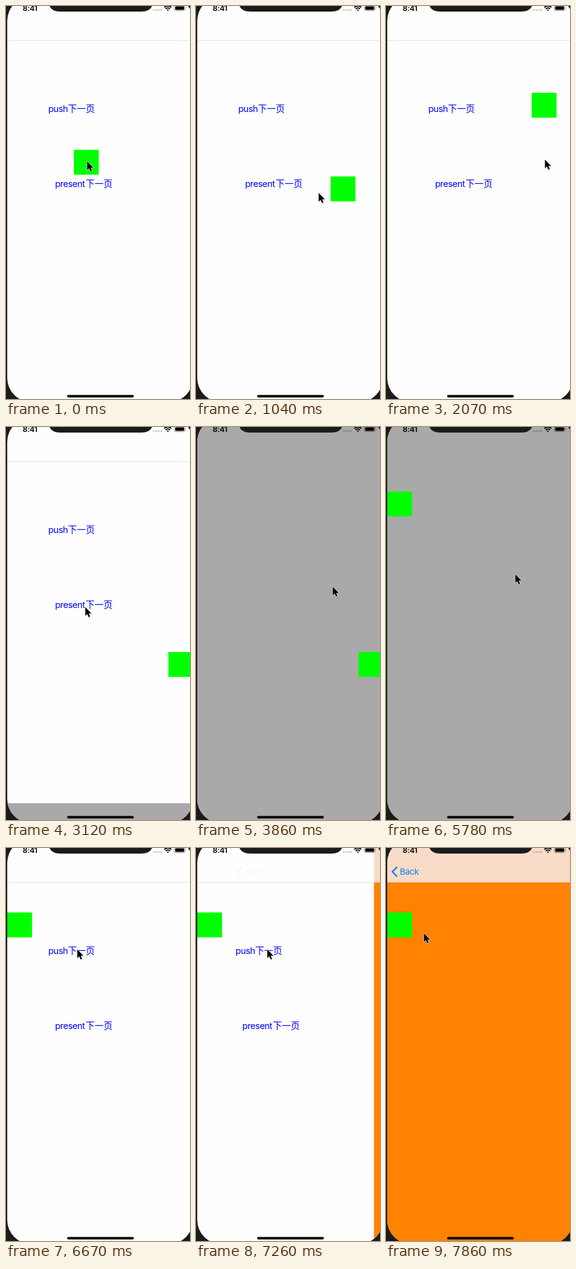
Animation of 298 by 634 pixels, one loop 8 s. Source, as an HTML page:

```html
<!DOCTYPE html>
<html lang="zh">
<head>
<meta charset="utf-8">
<title>Floating square</title>
<style>
  html, body { margin: 0; width: 100%; height: 100%; overflow: hidden; background: #1c1b1c; }
  svg { display: block; width: 298px; height: 634px; }
  text { font-family: Inter, "Noto Sans CJK SC", "Noto Sans CJK", sans-serif; }
  .label { font-size: 14.5px; fill: #00f; }
  .latin { letter-spacing: -.037em; }
  .han { font-family: "Noto Sans CJK SC", "Noto Sans CJK", sans-serif; font-weight: 300; }
  .back { font-size: 13.7px; fill: #0a7af5; letter-spacing: -.03em; }
  .time { font-size: 12.3px; font-weight: 600; letter-spacing: -.02em; }
</style>
</head>
<body>
<svg viewBox="0 0 298 634">
  <defs>
    <clipPath id="screen"><rect x="2" y="-15" width="301" height="654" rx="39"/></clipPath>
  </defs>
  <g clip-path="url(#screen)">
    <rect width="298" height="634" fill="#fefefe"/>
    <g id="home" class="label">
      <text x="68.5" y="171" class="latin">push</text>
      <text x="100.3" y="171" class="han">下一页</text>
      <text x="79.5" y="291.5" class="latin">present</text>
      <text x="129" y="291.5" class="han">下一页</text>
    </g>
    <rect y="55" width="298" height="1" fill="#e3e3e3"/>
    <g id="next">
      <rect x="2" y="55" width="301" height="584" fill="#ff8200"/>
      <rect x="2" y="-15" width="301" height="70.5" fill="#f8dcc7"/>
    </g>
    <g id="back">
      <path d="M18 30.5 10.3 38.2 18 46" fill="none" stroke="#0a7af5" stroke-width="2.3"/>
      <text class="back" x="22.5" y="43">Back</text>
    </g>
    <rect id="sheet" x="2" width="301" height="660" fill="#a9a9a9"/>
    <rect id="square" width="40.2" height="40.2" fill="#0f0"/>
    <text class="time" x="27" y="8">8:41</text>
    <path d="M239.5 6.5h13" stroke="#000" stroke-opacity=".22" stroke-width="3"
          stroke-linecap="round" stroke-dasharray="0 4"/>
    <g fill="none" stroke="#000" stroke-width="1.9">
      <path d="M256.4 2.3a8.4 8.4 0 0 1 11.4 0M258.6 4.7a5.1 5.1 0 0 1 7 0"/>
      <path d="M262.1 8 260.4 6.2a2.6 2.6 0 0 1 3.4 0Z" fill="#000" stroke="none"/>
    </g>
    <rect x="272.5" y="-1" width="17.5" height="8.5" rx="2.3" fill="none" stroke="#000" stroke-opacity=".4"/>
    <rect x="274" y=".4" width="14.5" height="5.8" rx="1.2"/>
    <path d="M291.2 1.8q1.4 1.4 0 3z" opacity=".4"/>
    <rect x="99" y="627.6" width="108" height="4" rx="2"/>
    <path d="M69 -5Q71 9 88 9H219Q236 9 238 -5Z" fill="#1c1b1c"/>
  </g>
  <g id="cursor">
    <path d="M0 1V15.8L3.5 12.6 6 18 8.4 17 6 11.7H11Z" opacity=".22" transform="translate(.6 .8)"/>
    <path d="M.4 .6V14.6L3.6 11.7 5.8 16.8 8.2 15.8 6.1 10.8H10.4Z" stroke="#fff"
          stroke-width="1.3" stroke-linejoin="round" paint-order="stroke"/>
  </g>
</svg>
<script>
const LOOP = 8000, STEPS = 54;      // the picture advances in even steps
const GRAB = [21, 18], LEAD = 0.8;  // the dragged square trails the pointer

// Corners of the two drags, passed two steps apart; each ends at a screen edge.
const firstDrag = [[110, 232], [9, 390], [150, 109], [218, 275], [116, 295],
                   [130, 65], [236, 140], [236, 363], [263, 363]];
const secondDrag = [[263, 363], [220, 375], [118, 208], [110, 552], [20, 250], [2, 104]];

// Free pointer movements: from step, to step, destination.
const glides = [
  [15, 20, [128, 290]], [24, 26, [221, 257]], [26, 28, [284, 381]],
  [38, 39, [209, 237]], [41, 45, [115, 163]], [50, 53, [61, 137]]
];

const clamp = (v, max = 1) => Math.min(max, Math.max(0, v));
const smooth = p => p * p * (3 - 2 * p);
const mix = (a, b, p) => a.map((v, i) => v + (b[i] - v) * p);

// Critically damped spring from 0 to 1.
function spring(elapsed) {
  const x = 2.6 * Math.max(0, elapsed);
  return 1 - (1 + x) * Math.exp(-x);
}

function along(points, position) {
  const p = clamp(position, points.length - 1);
  const i = Math.min(Math.floor(p), points.length - 2);
  return mix(points[i], points[i + 1], p - i);
}

const squareAt = step =>
  step < 28 ? along(firstDrag, (step - 1) / 2) : along(secondDrag, (step - 28) / 2);

function pointerAt(step) {
  const dragging = step < 15 || (step >= 28 && step < 39);
  if (dragging) return mix(squareAt(step + LEAD), [0, 0], 0).map((v, i) => v + GRAB[i]);
  return glides.reduce((at, [from, to, target]) =>
    mix(at, target, smooth(clamp((step - from) / (to - from)))), [257, 381]);
}

const [home, next, back, sheet, square, cursor] =
  ['home', 'next', 'back', 'sheet', 'square', 'cursor'].map(id => document.getElementById(id));
const move = (node, x, y = 0) => node.setAttribute('transform', `translate(${x} ${y})`);

function draw(time) {
  const step = Math.floor(time % LOOP / (LOOP / STEPS));
  const covered = spring(step - 20.865) - spring(step - 40.865);
  const push = spring(step - 48.865);
  move(square, ...squareAt(step));
  move(cursor, ...pointerAt(step));
  move(sheet, 0, 639 - 654 * covered);
  move(home, -90 * push);
  move(next, 301 * (1 - push));
  move(back, 60 * (1 - push));
  back.setAttribute('opacity', push);
}

const start = performance.now();
function tick() {
  draw(performance.now() - start);
  requestAnimationFrame(tick);
}
tick();
</script>
</body>
</html>
```
